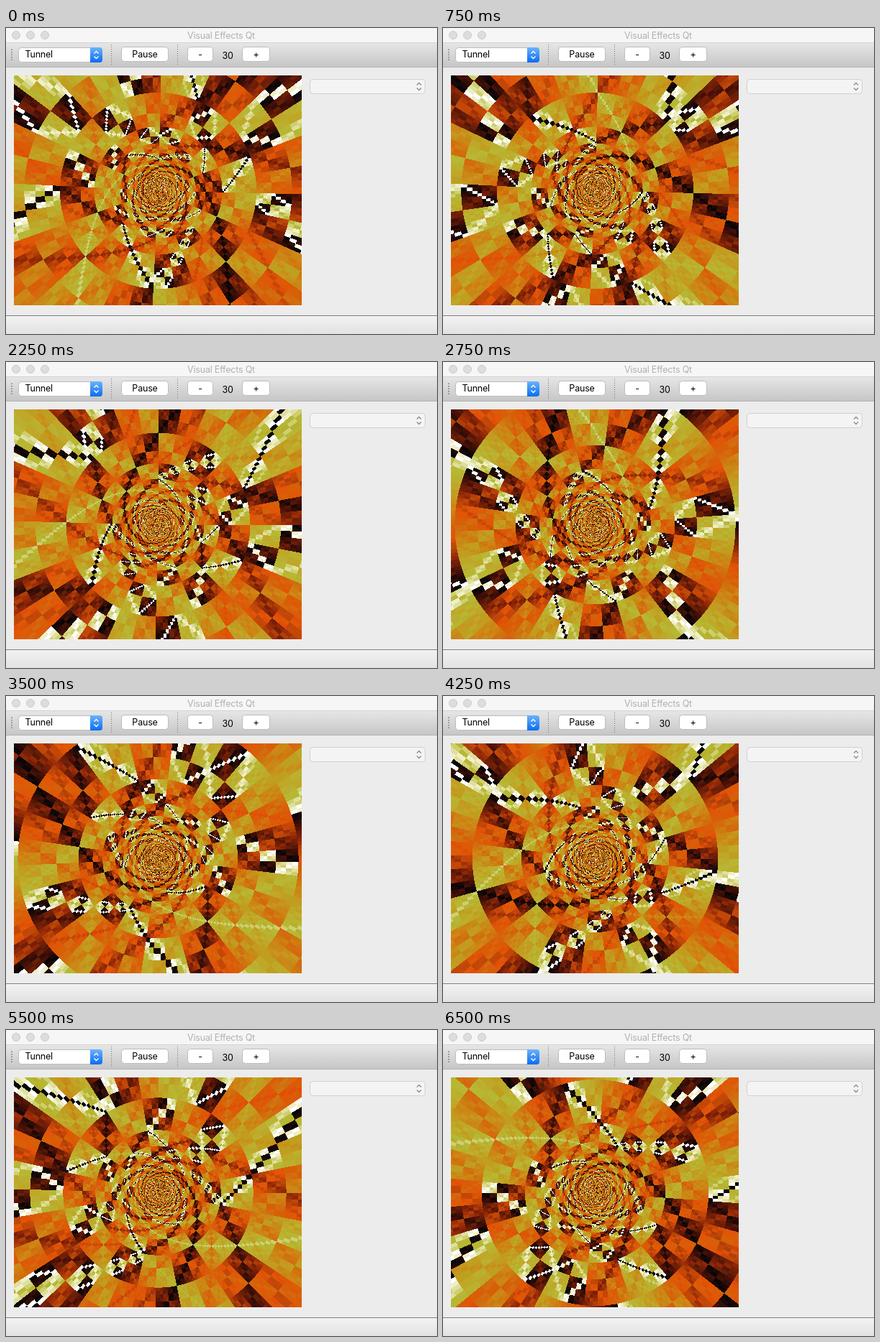
An HTML page with a canvas that plays this animation: 599 px wide and 426 px high, repeating every 6750 ms.

```html
<!DOCTYPE html>
<html>
<head>
<meta charset="utf-8">
<style>
html, body { margin: 0; width: 599px; height: 426px; overflow: hidden; background: #ececec; }
svg, canvas { position: absolute; left: 0; top: 0; }
canvas { left: 11px; top: 66px; }
text { font: 12.5px Inter, Roboto, sans-serif; letter-spacing: -.2px; fill: #000; }
.mid { text-anchor: middle; }
.btn { fill: #fff; stroke: #bdbdbd; }
.light { fill: #dddddd; stroke: #cbcbcb; }
.sep { stroke: #777; stroke-dasharray: 1 2; }
</style>
</head>
<body>
<svg width="599" height="426">
  <defs>
    <linearGradient id="bar" x2="0" y2="1"><stop stop-color="#e6e6e6"/><stop offset="1" stop-color="#c6c6c6"/></linearGradient>
    <linearGradient id="foot" x2="0" y2="1"><stop stop-color="#f2f2f2"/><stop offset="1" stop-color="#e2e2e2"/></linearGradient>
    <linearGradient id="blue" x2="0" y2="1"><stop stop-color="#6bb3fa"/><stop offset="1" stop-color="#0a6cf5"/></linearGradient>
    <path id="arrows" d="M-3-2L0-5L3-2M-3 2L0 5L3 2" fill="none" stroke-width="1.4"/>
  </defs>
  <rect width="599" height="20" fill="#f6f6f6"/>
  <rect y="20" width="599" height="1" fill="#d2d2d2"/>
  <rect y="21" width="599" height="33" fill="url(#bar)"/>
  <rect y="54" width="599" height="1" fill="#b4b4b4"/>
  <rect y="400" width="599" height="1" fill="#808080"/>
  <rect y="401" width="599" height="25" fill="url(#foot)"/>

  <g class="light"><circle cx="14" cy="10" r="5.5"/><circle cx="34" cy="10" r="5.5"/><circle cx="54" cy="10" r="5.5"/></g>
  <text class="mid" x="299" y="15" style="fill:#b0b0b0">Visual Effects Qt</text>

  <path d="M8 29.5V45" stroke="#8a8a8a" stroke-width="2" stroke-dasharray="1.5 2"/>
  <path class="sep" d="M146.5 23V52M238.5 23V52"/>

  <rect class="btn" x="17.5" y="27.5" width="116" height="20" rx="4"/>
  <path d="M117 27H130a4 4 0 0 1 4 4V44a4 4 0 0 1-4 4H117Z" fill="url(#blue)"/>
  <use href="#arrows" x="125.5" y="37.5" stroke="#fff"/>
  <text x="26.5" y="41">Tunnel</text>

  <rect class="btn" x="160.5" y="26.5" width="65" height="20" rx="4"/>
  <text class="mid" x="193" y="41">Pause</text>
  <rect class="btn" x="252.5" y="26.5" width="35" height="20" rx="4"/>
  <text class="mid" x="270" y="41">-</text>
  <text class="mid" x="308" y="43">30</text>
  <rect class="btn" x="328.5" y="26.5" width="38" height="20" rx="4"/>
  <text class="mid" x="347.5" y="41">+</text>

  <rect x="422.5" y="71.5" width="160" height="20" rx="4" fill="#f4f4f4" stroke="#d0d0d0"/>
  <use href="#arrows" x="574" y="81.5" stroke="#8c8c8c"/>
</svg>
<canvas id="view" width="400" height="320"></canvas>
<script>
const W = 400, H = 320, STEP = 250, LOOP = 6750;
const ctx = document.getElementById('view').getContext('2d');
const image = ctx.createImageData(W, H);
const pixels = new Uint32Array(image.data.buffer);

// Fire colours, black to white
const fire = ('070707 1f0707 2f0f07 470f07 571707 671f07 771f07 8f2707 9f2f07 af3f07 ' +
  'bf4707 c74707 df4f07 df5707 df5707 d75f07 d75f07 d7670f cf6f0f cf770f cf7f0f cf8717 ' +
  'c78717 c78f17 c7971f bf9f1f bf9f1f bfa727 bfa727 bfaf2f b7af2f b7b72f b7b737 ' +
  'cfcf6f dfdf9f efefc7 ffffff').split(' ').map(hex => {
    const c = parseInt(hex, 16);
    return (255 << 24 | (c & 255) << 16 | (c & 0xff00) | c >> 16) >>> 0;
  });

// Polar lookup for each pixel
const angle = new Int16Array(W * H), depth = new Int16Array(W * H);
for (let i = 0; i < W * H; i++) {
  const x = i % W - W / 2, y = Math.floor(i / W) - H / 2;
  angle[i] = Math.trunc(128 * Math.atan2(x, y) / Math.PI);
  depth[i] = Math.floor(4096 / (Math.hypot(x, y) || 1)) & 255;
}

// Forward travel: [step, distance]
const travel = [[0, 2], [6, 130], [9, 192], [14, 299], [17, 360], [22, 465], [26, 550]];

function distanceAt(step) {
  const k = travel.findIndex(p => p[0] >= step);
  if (k === 0) return travel[0][1];
  const [s0, d0] = travel[k - 1], [s1, d1] = travel[k];
  return Math.round(d0 + (d1 - d0) * (step - s0) / (s1 - s0));
}

function draw(step) {
  const move = distanceAt(step), turn = move >> 1;
  for (let i = 0; i < pixels.length; i++) {
    const xor = ((depth[i] + move) ^ (angle[i] + turn)) & 255;
    pixels[i] = fire[xor % fire.length];
  }
  ctx.putImageData(image, 0, 0);
}

let shown = -1;
function tick() {
  const step = Math.floor(performance.now() % LOOP / STEP);
  if (step !== shown) draw(shown = step);
  requestAnimationFrame(tick);
}
tick();
</script>
</body>
</html>
```
